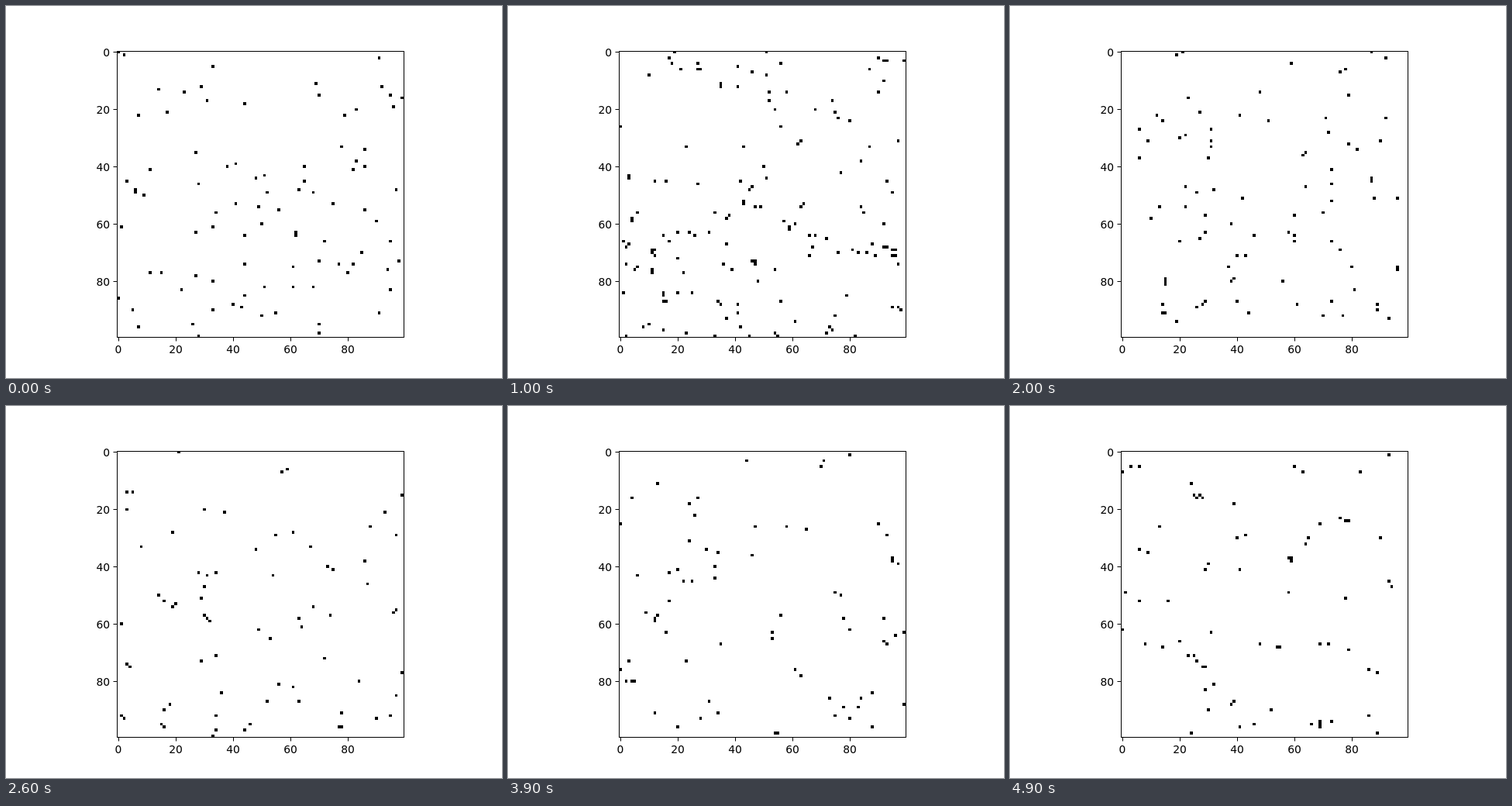
Write an HTML page with a canvas that moves like this. It is 640 px wide and 480 px high and loops after 5 s.

```html
<!DOCTYPE html>
<html lang="en">
<head>
<meta charset="utf-8">
<title>Sparse firing on a lattice</title>
<style>
  html, body { margin: 0; width: 100%; height: 100%; overflow: hidden; background: #fff; }
  canvas, svg { position: absolute; left: 0; top: 0; width: 640px; height: 480px; }
  text { font: 13.89px "DejaVu Sans", sans-serif; fill: #000; }
</style>
</head>
<body>
<canvas id="grid" width="640" height="480"></canvas>
<svg id="axes" viewBox="0 0 640 480"></svg>
<script>
const SIZE = 100, STEPS = 50, STEP_MS = 100;
const LEFT = 143.2, TOP = 57.6, CELL = 3.696;
const REST = 4;         // steps a cell stays quiet after firing
const CHANCE = 0.3;     // share of cells that fire without a neighbour
const TURN = 0.8;       // how far a wave may bend per step, in radians

function seeded(seed) {
  return () => {
    seed = (seed + 0x6D2B79F5) | 0;
    let n = Math.imul(seed ^ (seed >>> 15), 1 | seed);
    n = (n + Math.imul(n ^ (n >>> 7), 61 | n)) ^ n;
    return ((n ^ (n >>> 14)) >>> 0) / 4294967296;
  };
}

const rand = seeded(2718);
const inside = v => v >= 0 && v < SIZE;

// Activity swells early in the loop, then settles
const activity = step => Math.round(72 + 80 * Math.exp(-(((step - 10) / 8) ** 2)));

// Firing cells push short, wandering waves across the lattice
function simulate() {
  const lastFired = new Map();
  const history = [];
  let parents = [];

  for (let step = 0; step < STEPS; step++) {
    const cells = [];
    const count = activity(step);
    while (cells.length < count) {
      let x = rand() * SIZE, y = rand() * SIZE;
      let heading = rand() * 2 * Math.PI;
      if (parents.length && rand() > CHANCE) {
        const p = parents[Math.floor(rand() * parents.length)];
        const reach = 2 + rand() * 2;
        heading = p.heading + (rand() * 2 - 1) * TURN;
        x = p.x + reach * Math.cos(heading);
        y = p.y + reach * Math.sin(heading);
      }
      x = Math.floor(x);
      y = Math.floor(y);
      const id = y * SIZE + x;
      const resting = lastFired.has(id) && step - lastFired.get(id) < REST;
      if (!inside(x) || !inside(y) || resting) continue;
      lastFired.set(id, step);
      cells.push({ x, y, heading });
    }
    history.push(cells);
    parents = cells;
  }
  return history;
}

const ctx = document.getElementById("grid").getContext("2d");
ctx.beginPath();
ctx.rect(144, 59, 369, 368);
ctx.clip();

function draw(cells) {
  ctx.fillStyle = "#fff";
  ctx.fillRect(144, 59, 369, 368);
  ctx.fillStyle = "#000";
  const edge = (start, i) => Math.round(start + i * CELL);
  for (const { x, y } of cells) {
    const px = edge(LEFT, x), py = edge(TOP, y);
    ctx.fillRect(px, py, edge(LEFT, x + 1) - px, edge(TOP, y + 1) - py);
  }
}

function buildAxes() {
  let marks = '<rect x="143.5" y="58.5" width="370" height="369" fill="none" stroke="#000"/>';
  for (let v = 0; v < SIZE; v += 20) {
    const x = Math.round(LEFT + (v + 0.5) * CELL);
    const y = Math.round(TOP + (v + 0.5) * CELL);
    marks += `<path d="M${x + 0.5} 427.5v5M138.5 ${y + 0.5}h5" stroke="#000"/>
      <text x="${x}" y="448" text-anchor="middle">${v}</text>
      <text x="134.2" y="${y + 6}" text-anchor="end">${v}</text>`;
  }
  document.getElementById("axes").innerHTML = marks;
}

const history = simulate();
buildAxes();
draw(history[0]);
const start = performance.now();
let shown = 0;

function tick() {
  const step = Math.floor((performance.now() - start) / STEP_MS) % STEPS;
  if (step !== shown) draw(history[shown = step]);
  requestAnimationFrame(tick);
}
requestAnimationFrame(tick);
</script>
</body>
</html>
```
